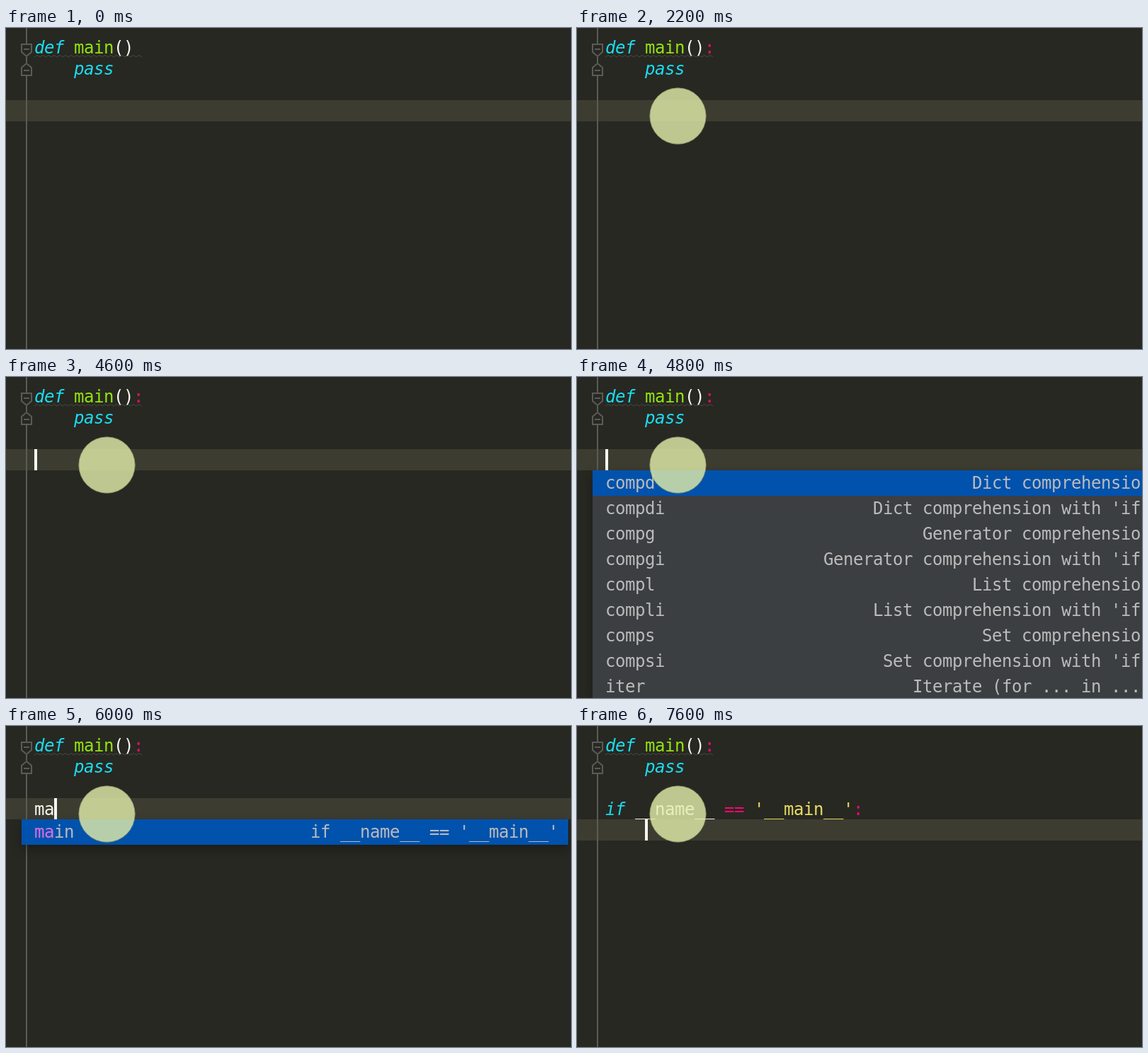
An HTML page with a canvas that plays this animation: 798x454 px, repeating every 8 s.

```html
<!DOCTYPE html>
<html lang="en">
<head>
<meta charset="utf-8">
<style>
  html, body { margin: 0; width: 798px; height: 454px; overflow: hidden; background: #272822; }
  canvas { display: block; }
</style>
</head>
<body>
<canvas id="stage" width="798" height="454"></canvas>
<script>
const ctx = document.getElementById('stage').getContext('2d');
const LOOP = 8000, COL = 14, LINE = 30, ROW = 36, LEFT = 40;
const FONT = '24px "DejaVu Sans Mono", monospace';
const CYAN = '#1bdcf0', GREEN = '#94e40c', PINK = '#f9086f', YELLOW = '#e8dc62';
const WHITE = '#f8f8f2', GREY = '#bbbbbb', MATCH = '#dd6ee0', GUTTER = '#5a5b57';

// Pointer halo: time and centre
const HALO = [[200, 371, 29], [400, 255.5, 70], [600, 185.5, 100], [800, 154.5, 119], [1000, 142.5, 124.5]];
// Times when the caret turns on or off, starting from off
const BLINK = [1400, 2200, 3000, 3800, 4600, 5400, 5800, 7000, 7600];
const TYPED = [[5800, 'm'], [6000, 'ma'], [6200, 'main']];

const MAIN = ['main', "if __name__ == '__main__'"];
const TEMPLATES = [];
for (const [key, kind] of [['d', 'Dict'], ['g', 'Generator'], ['l', 'List'], ['s', 'Set']]) {
  TEMPLATES.push(['comp' + key, kind + ' comprehension'],
                 ['comp' + key + 'i', kind + " comprehension with 'if'"]);
}
const ITER = ['iter', 'Iterate (for ... in ...)'];

const latest = (list, t) => list.filter(item => item[0] <= t).pop();

function rect(x, y, w, h, color) {
  ctx.fillStyle = color;
  ctx.fillRect(x, y, w, h);
}

// Fixed-pitch text on whole-pixel columns
function text(str, x, y, color, italic) {
  ctx.font = (italic ? 'italic ' : '') + FONT;
  ctx.fillStyle = color;
  [...str].forEach((ch, i) => ctx.fillText(ch, x + i * COL, y));
}

function code(line, col, str, color, italic) {
  text(str, LEFT + col * COL, 36 + line * LINE, color, italic);
}

function path(points, color, width, close) {
  ctx.beginPath();
  points.forEach(([x, y]) => ctx.lineTo(x, y));
  if (close) ctx.closePath();
  ctx.strokeStyle = color;
  ctx.lineWidth = width;
  ctx.stroke();
}

function foldMark(flat, shoulder, tip, dash) {
  path([[22, flat], [36, flat], [36, shoulder], [29, tip], [22, shoulder]], GUTTER, 2, true);
  rect(25, dash, 8, 2, GUTTER);
}

function gutter() {
  rect(28, 0, 2, 22, GUTTER);
  rect(28, 41, 2, 8, GUTTER);
  rect(28, 68, 2, 386, GUTTER);
  foldMark(23, 34, 40, 29);
  foldMark(67, 56, 50, 59);
}

function squiggle() {
  const points = [];
  for (let x = LEFT; x <= 194; x += 4) points.push([x, x % 8 ? 38.5 : 41]);
  path(points, '#48493f', 1);
}

function popup(rows, right, typed) {
  const width = right - 22, height = rows.length * ROW;
  ctx.save();
  ctx.shadowColor = 'rgba(0,0,0,.3)';
  ctx.shadowBlur = 16;
  ctx.shadowOffsetY = 6;
  rect(22, 132, width, height, '#3c3f41');
  ctx.restore();
  rect(22, 132, width, ROW, '#0052ad');
  rows.forEach(([name, info], i) => {
    const y = 158 + i * ROW;
    const from = name.indexOf(typed), to = from + typed.length;
    [...name].forEach((ch, k) => text(ch, LEFT + k * COL, y, k >= from && k < to ? MATCH : GREY));
    text(info, right - 14 - info.length * COL, y, GREY);
  });
}

function halo(x, y) {
  ctx.beginPath();
  ctx.arc(x, y, 40, 0, 2 * Math.PI);
  ctx.fillStyle = 'rgba(228,239,170,.8)';
  ctx.fill();
  ctx.beginPath();
  ctx.arc(x, y, 39.7, 0, 2 * Math.PI);
  ctx.strokeStyle = 'rgba(90,96,60,.5)';
  ctx.lineWidth = 1;
  ctx.stroke();
}

function draw(t) {
  const expanded = t >= 7600;
  const typed = expanded ? '' : (latest(TYPED, t) || [0, ''])[1];
  const caretY = expanded ? 132 : 102;

  rect(0, 0, 798, 454, '#272822');
  rect(0, caretY, 798, LINE, '#3d3c31');
  gutter();
  squiggle();

  code(0, 0, 'def', CYAN, true);
  code(0, 4, 'main', GREEN);
  code(0, 8, '()', WHITE);
  if (t >= 200) code(0, 10, ':', PINK);
  code(1, 4, 'pass', CYAN, true);
  code(3, 0, typed, WHITE);
  if (expanded) {
    code(3, 0, 'if', CYAN, true);
    code(3, 3, '__name__', WHITE);
    code(3, 12, '==', PINK);
    code(3, 15, "'__main__'", YELLOW);
    code(3, 25, ':', PINK);
  }

  if (BLINK.filter(b => b <= t).length % 2) {
    const col = expanded ? 4 : typed.length;
    rect(LEFT + col * COL, caretY, 4, LINE, WHITE);
  }

  if (t >= 4800 && !expanded) {
    if (typed.length > 1) popup([MAIN], 794, typed);
    else popup(typed ? [MAIN, ...TEMPLATES] : [...TEMPLATES, ITER], 824, typed);
  }

  const spot = latest(HALO, t);
  if (spot) halo(spot[1], spot[2]);
}

const start = performance.now();
function tick() {
  draw((performance.now() - start) % LOOP);
  requestAnimationFrame(tick);
}
tick();
</script>
</body>
</html>
```
